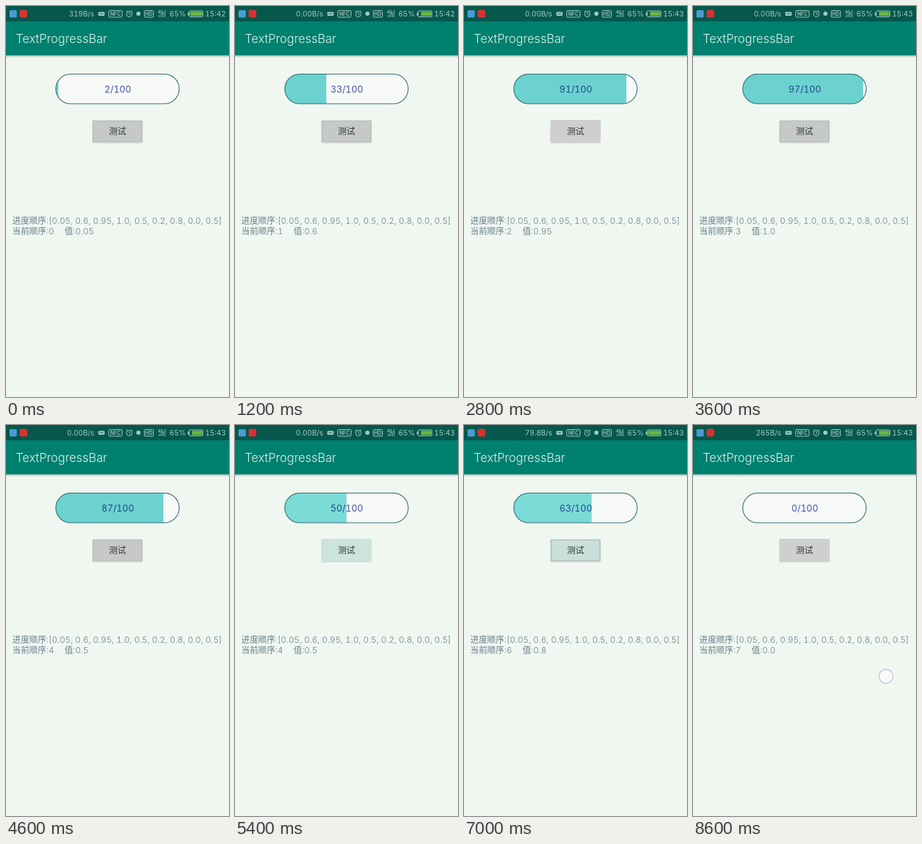
Animation of 320 by 560 pixels, one loop 8800 ms. Source, as an HTML page:

```html
<!DOCTYPE html>
<html lang="zh">
<head>
<meta charset="utf-8">
<title>TextProgressBar</title>
<style>
html, body { margin: 0; width: 100%; height: 100%; overflow: hidden; background: #f0f7f1; }
svg { display: block; width: 100%; height: 100%; }
text {
  font-family: Inter, "Noto Sans CJK SC", "Noto Sans CJK", sans-serif;
  font-weight: 300;
  font-feature-settings: "tnum";
}
.status text { font-size: 10.4px; font-weight: 400; fill: #a3c9c1; }
.status .tag { font-size: 7px; font-weight: 600; text-anchor: middle; }
.line { fill: none; stroke: #a3c9c1; stroke-width: 1; }
.title { font-size: 17.2px; fill: #dcf3ee; }
.info text { font-size: 12.2px; fill: #667f8a; }
#count { font-size: 13px; font-weight: 400; fill: #4656a8; text-anchor: middle; mix-blend-mode: multiply; }
.label { font-size: 12.3px; font-weight: 400; fill: #303434; text-anchor: middle; }
</style>
</head>
<body>
<svg viewBox="0 0 320 560">
  <defs>
    <linearGradient id="drop" x2="0" y2="1">
      <stop offset="0" stop-color="#8fb0a8"/>
      <stop offset="1" stop-color="#f0f7f1"/>
    </linearGradient>
    <clipPath id="pill"><rect x="71.5" y="97.5" width="177" height="42.5" rx="21.25"/></clipPath>
  </defs>

  <rect width="320" height="560" fill="#f0f7f1"/>
  <rect y="70" width="320" height="4" fill="url(#drop)"/>
  <rect y="22" width="320" height="48.5" fill="#00806f"/>
  <rect width="320" height="22" fill="#06574c"/>

  <g class="status">
    <rect x="5" y="6" width="10.5" height="10.5" rx="1.5" fill="#4a9bd0"/>
    <rect x="19.5" y="5.5" width="11" height="11" rx="2" fill="#d8322f"/>
    <text id="speed" x="126.5" y="15" text-anchor="end"></text>
    <rect x="132.5" y="8.5" width="9" height="5.5" rx="1" fill="#a3c9c1"/>
    <path d="M134.5 11.2h5" stroke="#06574c"/>
    <rect class="line" x="147.5" y="6.5" width="19" height="9.5" rx="1.5"/>
    <text class="tag" x="157" y="13.8">NFC</text>
    <circle class="line" cx="177" cy="11.5" r="4"/>
    <path class="line" d="M177 9v2.7l2 1M172.5 8.5l2-2M181.5 8.5l-2-2"/>
    <circle cx="190" cy="11" r="3" fill="#a3c9c1"/>
    <rect class="line" x="198.5" y="6.5" width="13" height="9.5" rx="1"/>
    <text class="tag" x="205" y="13.8">HD</text>
    <text x="218" y="10.5" style="font-size:5.5px;font-weight:600">4G</text>
    <path class="line" d="M220 16v-3M222.7 16v-4.5M225.4 16V9M228.1 16V6" stroke-width="1.4"/>
    <text x="234.5" y="15">65%</text>
    <rect x="260.8" y="9.5" width="2" height="4" fill="#a3c9c1"/>
    <rect class="line" x="263" y="7" width="19.5" height="8.5" rx="1"/>
    <rect id="charge" y="8.3" height="5.9" fill="#6cb744"/>
    <text id="clock" x="315.5" y="15" text-anchor="end"></text>
  </g>
  <text class="title" x="14" y="53">TextProgressBar</text>

  <g style="isolation:isolate">
    <g clip-path="url(#pill)">
      <rect x="71" y="97" width="178" height="44" fill="#f7f9f7"/>
      <rect id="fill" x="71.5" y="97" height="44" fill="#6bd2cf"/>
    </g>
    <rect x="71.5" y="97.5" width="177" height="42.5" rx="21.25" fill="none" stroke="#2f6b70" stroke-width="1.1"/>
    <text id="count" x="160.5" y="123.7"></text>
  </g>

  <rect x="123.5" y="164" width="73" height="33" rx="2" fill="#dbe2dd"/>
  <rect id="button" stroke="#b8bfbe"/>
  <text class="label" x="160" y="183.5">测试</text>

  <g class="info">
    <text x="9" y="312.3">进度顺序:[0.05, 0.6, 0.95, 1.0, 0.5, 0.2, 0.8, 0.0, 0.5]</text>
    <text id="order" x="9" y="326.8"></text>
    <text id="value" x="84" y="326.8"></text>
  </g>
  <circle id="touch" cx="277" cy="360" r="10" fill="#f8faf9" stroke="#cbc3de" stroke-width="1.3"/>
</svg>

<script>
const LOOP = 8800, STEP = 200, RUN = 800;
const goals = ['0.05', '0.6', '0.95', '1.0', '0.5', '0.2', '0.8', '0.0'];
const taps = [-360, 790, 2170, 3200, 4330, 5450, 6485, 7570];
const speeds = [[0, '319B/s'], [600, '0.00B/s'], [6200, '79.8B/s'], [8000, '265B/s']];

const $ = id => document.getElementById(id);
const setText = (id, s) => { if ($(id).textContent !== s) $(id).textContent = s; };
const setAttrs = (id, attrs) => {
  for (const k in attrs) $(id).setAttribute(k, attrs[k]);
};
const ease = p => 0.5 - Math.cos(Math.PI * Math.min(1, p)) / 2;

function draw(t) {
  const i = taps.filter(s => s <= t).length - 1;
  const age = t - taps[i];
  const from = i ? +goals[i - 1] : 0;
  const v = from + (goals[i] - from) * ease(age / RUN);
  const mint = t >= 5000 && t < 7200;

  setText('count', Math.floor(v * 100 + 1e-6) + '/100');
  setAttrs('fill', { width: 177 * v, fill: mint ? '#7bdbd7' : '#6bd2cf' });
  setText('order', '当前顺序:' + i);
  setText('value', '值:' + goals[i]);

  const s = speeds.filter(e => e[0] <= t).length - 1;
  const left = s % 2 ? 267 : 264.3;
  setText('speed', speeds[s][1]);
  setAttrs('charge', { x: left, width: 281.5 - left });
  setText('clock', t < 2000 ? '15:42' : '15:43');

  // the button lifts for a moment after each tap
  const up = age < 560;
  setAttrs('button', up
    ? { x: 125, y: 164.5, width: 70, height: 30, rx: 0.5, 'stroke-width': 1.6, fill: mint ? '#c9e0da' : '#c7c9c9' }
    : { x: 124, y: 163, width: 72, height: 33, rx: 2, 'stroke-width': 0, fill: mint ? '#cde3de' : '#cfcfcf' });
  $('touch').style.display = t >= 8600 ? '' : 'none';
}

const start = performance.now();
function tick(now) {
  const t = Math.max(0, now - start) % LOOP;
  draw(Math.floor(t / STEP) * STEP);
  requestAnimationFrame(tick);
}
draw(0);
requestAnimationFrame(tick);
</script>
</body>
</html>
```
